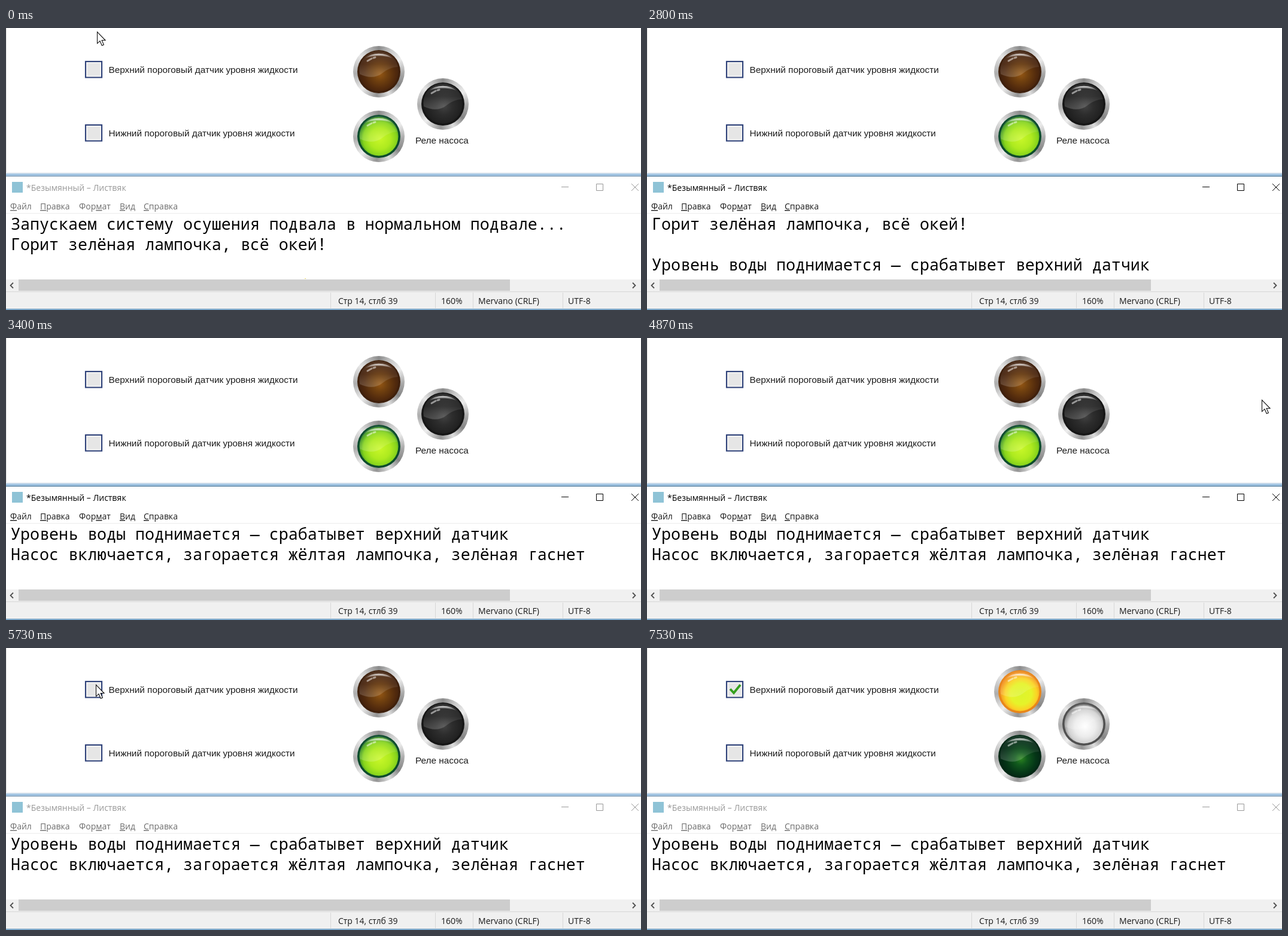
Recreate the animation shown at these times as an HTML page. Size 1061x471 px, loop 8 s.

```html
<!DOCTYPE html>
<html lang="ru">
<head>
<meta charset="utf-8">
<style>
html, body { margin: 0; width: 100%; height: 100%; overflow: hidden; background: #fff; }
.ring {
  position: absolute; width: 86px; height: 86px; border-radius: 50%;
  background: conic-gradient(#8b8b8b, #c9c9c9 30deg, #ececec 60deg, #a8a8a8 95deg, #868686 125deg,
    #dedede 155deg, #949494 185deg, #ededed 225deg, #adadad 265deg, #e6e6e6 310deg, #8b8b8b);
}
svg { position: absolute; left: 0; top: 0; }
text { white-space: pre; }
.label { font: 15.33px "Liberation Sans", sans-serif; fill: #1c1c1c; }
.ui { font: 14px "Open Sans", sans-serif; fill: #1a1a1a; }
.note { font: 26.67px "Noto Sans Mono", monospace; fill: #000; }
.u { text-decoration: underline; }
#menu text { fill: inherit; }
</style>
</head>
<body>
<svg id="stage" width="1061" height="471" viewBox="0 0 1061 471"></svg>
<script>
const LOOP = 8000;
const stage = document.getElementById('stage');

function el(tag, attrs, parent = stage, content) {
  const node = document.createElementNS('http://www.w3.org/2000/svg', tag);
  for (const key in attrs) node.setAttribute(key, attrs[key]);
  if (content) node.textContent = content;
  parent.append(node);
  return node;
}
const rect = (x, y, width, height, fill, parent) => el('rect', { x, y, width, height, fill }, parent);
const text = (cls, x, y, content, parent) => el('text', { class: cls, x, y }, parent, content);
const show = (node, on) => { node.style.visibility = on ? 'visible' : 'hidden'; };

const defs = el('defs', {});
let gradients = 0;
function gradient(kind, attrs, stops) {
  const id = 'g' + gradients++;
  const g = el(kind, { id, ...attrs }, defs);
  for (const [offset, color, opacity = 1] of stops)
    el('stop', { offset, 'stop-color': color, 'stop-opacity': opacity }, g);
  return `url(#${id})`;
}

const gloss = gradient('linearGradient', { x1: 0, y1: 0, x2: 0, y2: 1 },
  [[0, '#fff', .1], [.5, '#fff', .06], [1, '#fff', .18]]);
const crescent = gradient('linearGradient', { x1: 0, y1: 0, x2: 0, y2: 1 },
  [[0, '#fff', .8], [1, '#fff', 0]]);

function glass(cx, cy, rim, stops) {
  const g = el('g', { transform: `translate(${cx} ${cy})` });
  el('circle', { r: 36, fill: rim }, g);
  el('circle', { r: 32.5, fill: gradient('radialGradient', { cx: .53, cy: .56, r: .54 }, stops) }, g);
  el('path', { d: 'M-32 4A32.5 32.5 0 0 1 32-8C22-8 14-4 5 3S-18 11-32 4Z', fill: gloss }, g);
  el('path', { d: 'M-23-22C-13-33 13-33 23-22C11-28-11-28-23-22Z', fill: crescent }, g);
  el('path', { d: 'M-19-18L-12-22M-9-23L-6-24', stroke: '#fff', 'stroke-opacity': .5,
    'stroke-width': 3, 'stroke-linecap': 'round' }, g);
  return g;
}

function lamp(cx, cy, off, on) {
  const ring = document.createElement('div');
  ring.className = 'ring';
  ring.style.left = cx - 43 + 'px';
  ring.style.top = cy - 43 + 'px';
  stage.before(ring);
  return { off: glass(cx, cy, ...off), on: glass(cx, cy, ...on) };
}

// Control panel
rect(0, 0, 1, 243, '#dcdcdc');
function checkbox(y) {
  el('rect', { x: 133, y, width: 27, height: 26.5, fill: '#e6e6e6', stroke: '#2f4279', 'stroke-width': 2.2 });
  el('rect', { x: 135, y: y + 2, width: 23, height: 22.5, fill: 'none', stroke: '#f6f6f6', 'stroke-width': 1.6 });
}
checkbox(56);
checkbox(162);
text('label', 171.5, 75, 'Верхний пороговый датчик уровня жидкости');
text('label', 171.5, 181, 'Нижний пороговый датчик уровня жидкости');
text('label', 684, 193, 'Реле насоса');
const check = el('path', { d: 'M139 68.5L145 75L156 61.5', fill: 'none', stroke: '#35a01e', 'stroke-width': 3.8 });

const lamps = [
  lamp(623, 73,
    ['#3f200c', [[0, '#935613'], [.35, '#70400f'], [.75, '#50290d'], [1, '#42200c']]],
    ['#e8861a', [[0, '#dcf52c'], [.5, '#e6f32a'], [.75, '#fbd325'], [1, '#f39220']]]),
  lamp(623, 181,
    ['#032815', [[0, '#2c8420'], [.3, '#11591d'], [.7, '#053617'], [1, '#032513']]],
    ['#0b4b2b', [[0, '#c8f728'], [.5, '#aeea1f'], [.8, '#86d41c'], [1, '#3f9422']]]),
  lamp(730, 127,
    ['#161616', [[0, '#414141'], [.4, '#2d2d2d'], [1, '#1b1b1b']]],
    ['#505050', [[0, '#fff'], [.5, '#ececec'], [.8, '#d2d2d2'], [1, '#8e8e8e']]]),
];

// Editor window
rect(0, 241, 1061, 2, '#e9eef3');
rect(0, 243, 1061, 4, '#a3c5e2');
rect(0, 247, 1061, 224, '#fff');
const edge = rect(0, 247, 1061, 1);
rect(10, 257, 18, 18, '#8fc3d6');
const title = text('ui', 34, 272, '*Безымянный – Листвяк');
const buttons = el('path', { d: 'M928 265.5h12M986.5 260.5h11v11h-11zM1045 260l12 12M1057 260l-12 12',
  fill: 'none' });

const menu = el('g', { id: 'menu' });
[[7, '', 'Ф', 'айл'], [57, '', 'П', 'равка'], [122, 'Фор', 'м', 'ат'], [190, '', 'В', 'ид'], [230, '', 'С', 'правка']]
  .forEach(([x, before, key, after]) => {
    const item = text('ui', x, 303, before, menu);
    el('tspan', { class: 'u' }, item, key);
    el('tspan', {}, item, after);
  });
rect(0, 309, 1061, 1, '#ececec');

const rows = [337, 371, 405].map(y => text('note', 8, y, ''));
const speck = rect(499, 418, 2, 1, '#e3d565');

rect(0, 420, 1061, 49, '#f0f0f0');
rect(21, 420, 821, 19, '#cdcdcd');
el('path', { d: 'M12 425.5L7.5 430L12 434.5M1047 425.5L1051.5 430L1047 434.5', fill: 'none',
  stroke: '#505050', 'stroke-width': 1.8 });
rect(0, 440, 1061, 1, '#d7d7d7');
[542, 717, 780, 930].forEach(x => rect(x, 442, 1, 26, '#d7d7d7'));
[[555, 'Стр 14, стлб 39'], [727, '160%'], [789, 'Mervano (CRLF)'], [939, 'UTF-8']]
  .forEach(([x, content]) => text('ui', x, 461, content));
rect(0, 469, 1061, 1, '#4f88b4');
rect(0, 470, 1061, 1, '#a3c5e2');

const cursor = el('path', { d: 'M.5.7V19.8L5 15.7L8.3 23.3L11.4 22L8.1 14.5H14Z', fill: '#fff',
  stroke: '#111', 'stroke-width': 1.1 });

// Timeline: [start, value] pairs, held until the next start
const start = 'Запускаем систему осушения подвала в нормальном подвале...';
const green = 'Горит зелёная лампочка, всё окей!';
const rising = 'Уровень воды поднимается — срабатывет верхний датчик';
const pump = 'Насос включается, загорается жёлтая лампочка, зелёная гаснет';
const notes = [
  [0, [start, green, '']],
  [2800, [green, '', rising]],
  [3000, ['', rising, pump]],
  [3400, [rising, pump, '']],
];
const focus = [[0, false], [2800, true], [5730, false]];

const ease = p => p * p * (3 - 2 * p);
const steps = (from, to, count, at) => Array.from({ length: count }, (_, i) =>
  [from + (to - from) * i / (count - 1), at(i / (count - 1))]);
const pointer = [
  [0, [152, 6]], [70, [450, 44]], [135, [848, 100]], [200, null],
  ...steps(4870, 5670, 12, p => {
    const q = ease(p);
    return [1027 - 879 * q, 103 * (1 - q) ** 2 - 34 * q * (1 - q) + 60 * q * q];
  }),
  [5730, [150, 61]],
  [6797, [146, 62]],
  ...steps(6863, 7463, 10, p => [150 + 827 * ease(p), 62 + 58 * ease(p)]),
  [7530, null],
];
const valueAt = (track, t) => track.findLast(([from]) => t >= from)[1];

function draw(t) {
  const active = valueAt(focus, t);
  title.style.fill = active ? '#000' : '#999';
  menu.style.fill = active ? '#1a1a1a' : '#6d6d6d';
  buttons.style.stroke = active ? '#000' : '#999';
  edge.style.fill = active ? '#2d6187' : '#6c8ba5';

  valueAt(notes, t).forEach((line, i) => {
    if (rows[i].textContent !== line) rows[i].textContent = line;
  });
  show(speck, t < 2800);
  show(check, t >= 6530);

  const flooded = t >= 6730;
  lamps.forEach(({ on, off }, i) => {
    const lit = (i === 1) !== flooded;
    show(on, lit);
    show(off, !lit);
  });

  const at = valueAt(pointer, t);
  show(cursor, at);
  if (at) cursor.setAttribute('transform', `translate(${at.map(Math.round)})`);
}

const origin = performance.now();
function tick() {
  draw((performance.now() - origin) % LOOP);
  requestAnimationFrame(tick);
}
tick();
</script>
</body>
</html>
```
